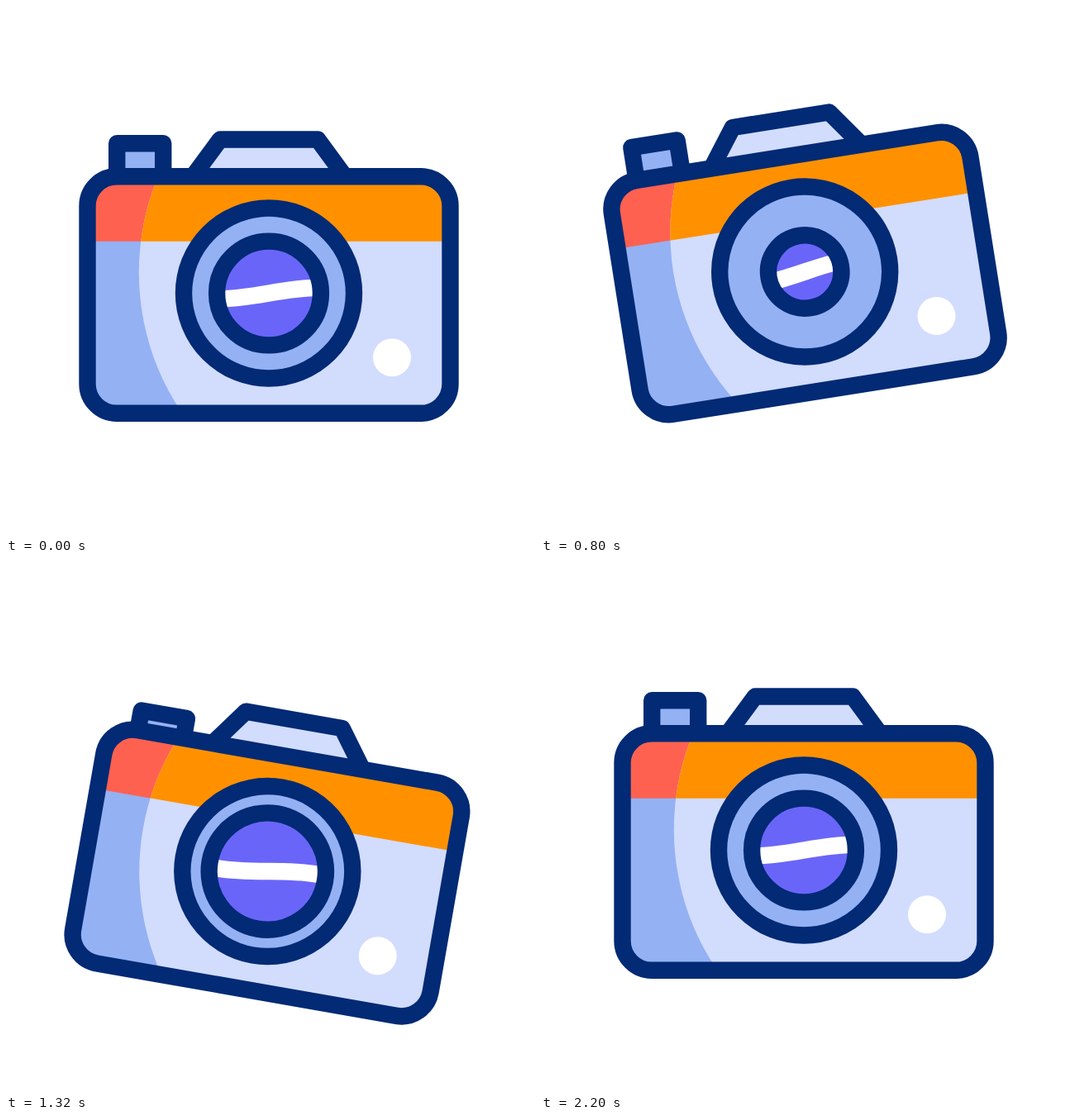
Recreate the animation shown at these times as an HTML page. Size 640 by 640 pixels, loop 2220 ms.

```html
<!DOCTYPE html>
<html lang="en">
<head>
<meta charset="utf-8">
<title>Camera</title>
<style>
  html, body { margin: 0; width: 100%; height: 100%; overflow: hidden; background: #fff; }
  svg { display: block; width: 100%; height: 100%; }
  .line { stroke: #022a75; stroke-width: 20.4; stroke-linejoin: round; }
  .ray { stroke: #ffcc50; stroke-width: 20.4; stroke-linecap: round; }
</style>
</head>
<body>
<svg viewBox="0 0 640 640">
  <defs>
    <clipPath id="bodyClip"><rect x="98.5" y="206.3" width="439" height="286.5" rx="35.5"/></clipPath>
    <clipPath id="shadeClip"><circle cx="463.8" cy="322.5" r="303"/></clipPath>
    <clipPath id="glassClip"><circle id="glassHole" cx="318" cy="347.5" r="63"/></clipPath>
  </defs>
  <g id="camera">
    <g id="rays"></g>
    <path id="button" class="line" fill="#94b1f3" d="M134.2 225V166.2H190.2V225"/>
    <path class="line" fill="#d2dcfd" d="M226 206.3L259 161.5H377.2L410 206.3"/>
    <g clip-path="url(#bodyClip)">
      <path fill="#94b1f3" d="M90 200H546V500H90Z"/>
      <path fill="#ff6150" d="M90 200H546V284.7H90Z"/>
      <g clip-path="url(#shadeClip)">
        <path fill="#d2dcfd" d="M90 200H546V500H90Z"/>
        <path fill="#ff9100" d="M90 200H546V284.7H90Z"/>
      </g>
    </g>
    <rect class="line" fill="none" x="98.5" y="206.3" width="439" height="286.5" rx="35.5"/>
    <circle cx="467" cy="425.2" r="23" fill="#fff"/>
    <circle class="line" cx="318" cy="347.5" r="103" fill="#94b1f3"/>
    <g clip-path="url(#glassClip)">
      <path fill="#6a65f9" d="M230 260H406V436H230Z"/>
      <path fill="none" stroke="#fff" stroke-width="20.4" d="M245 354.3H258C300 354.3 336 340.7 378 340.7H391"/>
    </g>
    <circle id="ring" class="line" cx="318" cy="347.5" r="63" fill="none"/>
  </g>
</svg>
<script>
  const LOOP = 2220;
  const $ = id => document.getElementById(id);

  // Inner end and outer end of each flash ray
  const RAYS = [
    [226.7, 133.5, 174.4, 79.5],
    [316.8, 115.7, 316.8, 41.2],
    [408.8, 131, 460.4, 79.2]
  ];
  const rays = RAYS.map(() => {
    const el = document.createElementNS('http://www.w3.org/2000/svg', 'line');
    el.setAttribute('class', 'ray');
    return $('rays').appendChild(el);
  });

  // Poses: time, angle, shift x, shift y, lens radius, button press
  const POSES = [
    [0, 0, 0, 0, 62.9, 0],
    [800, -9, 1.2, -26, 44.2, 0],
    [1333, 9.95, -1.7, 25.6, 70.7, 16],
    [1600, 0, 0, 0, 62.9, 0]
  ];

  function ease(t, from, to) {
    const s = Math.min(1, Math.max(0, (t - from) / (to - from)));
    return s * s * (3 - 2 * s);
  }

  const mix = (a, b, k) => a + (b - a) * k;

  function poseAt(t) {
    let i = 0;
    while (i < POSES.length - 2 && t >= POSES[i + 1][0]) i++;
    const a = POSES[i], b = POSES[i + 1];
    const k = ease(t, a[0], b[0]);
    return a.slice(1).map((v, n) => mix(v, b[n + 1], k));
  }

  function draw(t) {
    const [angle, dx, dy, radius, press] = poseAt(t);
    $('camera').setAttribute('transform', `translate(${dx} ${dy}) rotate(${angle} 318 347.5)`);
    $('button').setAttribute('transform', `translate(0 ${press})`);
    $('ring').setAttribute('r', radius);
    $('glassHole').setAttribute('r', radius);

    const head = ease(t, 1333, 2035), tail = ease(t, 1513, 2193);
    $('rays').setAttribute('visibility', head > tail ? 'visible' : 'hidden');
    RAYS.forEach(([x0, y0, x1, y1], i) => {
      const at = { x1: mix(x0, x1, tail), y1: mix(y0, y1, tail), x2: mix(x0, x1, head), y2: mix(y0, y1, head) };
      for (const key in at) rays[i].setAttribute(key, at[key]);
    });
  }

  const start = performance.now();
  function tick(now) {
    draw(Math.max(0, now - start) % LOOP);
    requestAnimationFrame(tick);
  }
  draw(0);
  requestAnimationFrame(tick);
</script>
</body>
</html>
```
